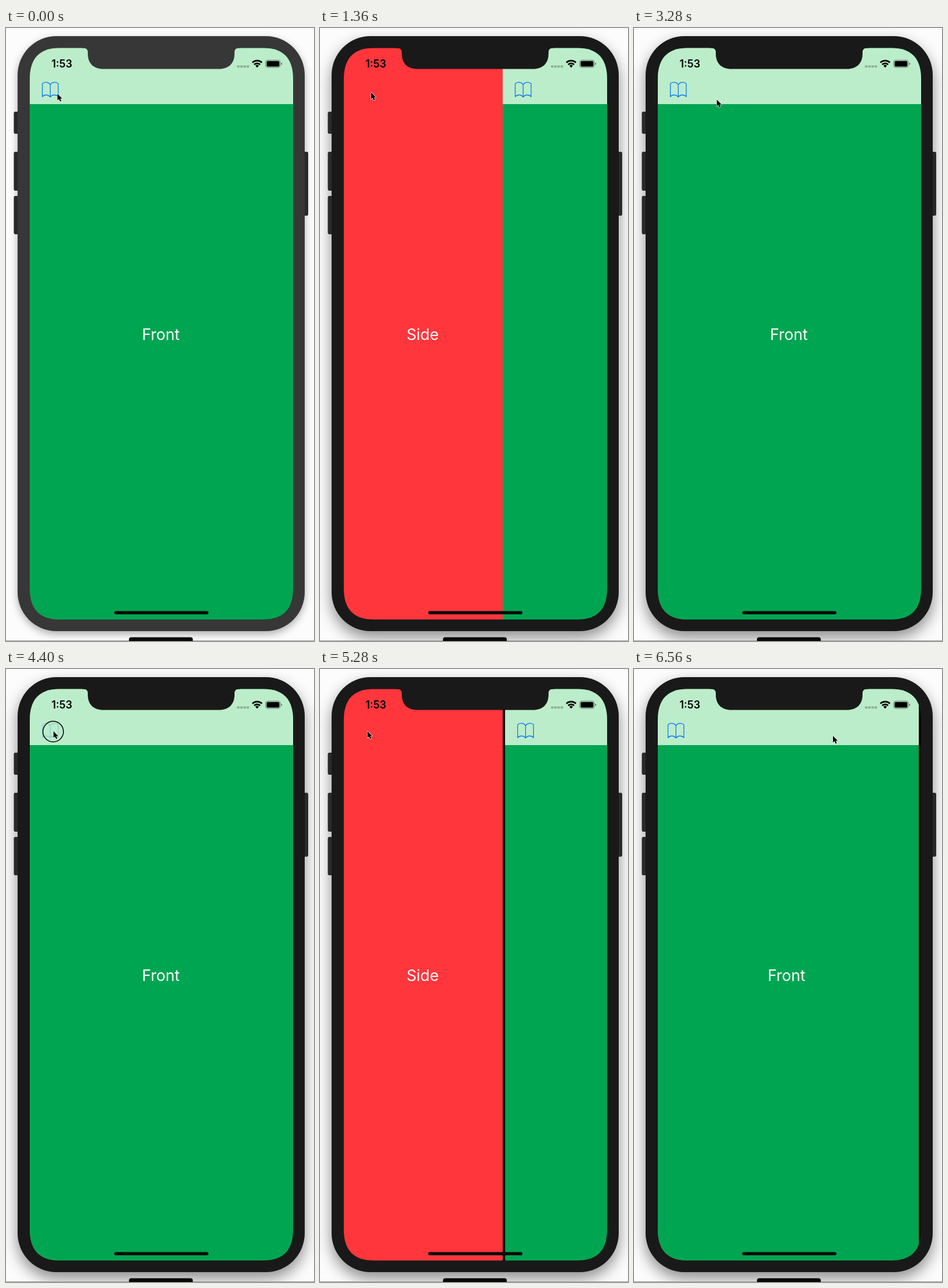
An HTML page for the animation above (6.64 s loop, 531x1055 px).

```html
<!DOCTYPE html>
<html lang="en">
<head>
<meta charset="utf-8">
<title>Side menu</title>
<style>
  html, body { margin: 0; width: 100%; height: 100%; overflow: hidden; background: #fcfcfc; }
  #stage { position: absolute; left: 0; top: 0; width: 531px; height: 1055px; overflow: hidden; }
  #body {
    position: absolute; left: 20px; top: 14px; width: 495px; height: 1024px;
    border-radius: 67px; background: #373737; box-shadow: 0 5px 14px rgba(0, 0, 0, .32);
  }
  .active #body { background: #191919; box-shadow: 0 11px 26px rgba(0, 0, 0, .45); }
  #notch { fill: #373737; }
  .active #notch { fill: #191919; }
  svg { position: absolute; left: 0; top: 0; }
  text { font-family: Inter, Roboto, sans-serif; }
  .label { font-size: 26.7px; fill: #fff; text-anchor: middle; }
</style>
</head>
<body>
<div id="stage">
  <div id="body"></div>
  <svg width="531" height="1055" viewBox="0 0 531 1055">
    <defs>
      <clipPath id="screen">
        <path d="M41 88 C41 52 58 34.5 92 34.5 H444 C478 34.5 495 52 495 88 V965 C495 1000 478 1018 444 1018 H92 C58 1018 41 1000 41 965 Z"/>
      </clipPath>
    </defs>

    <g fill="#292929">
      <path d="M20 144 H16 Q13.5 144 13.5 147 V179 Q13.5 182 16 182 H20 Z"/>
      <path d="M20 213 H16 Q13.5 213 13.5 216 V277 Q13.5 280 16 280 H20 Z"/>
      <path d="M20 289 H16 Q13.5 289 13.5 292 V352 Q13.5 355 16 355 H20 Z"/>
      <path d="M515 213 H518.5 Q521 213 521 216 V320 Q521 323 518.5 323 H515 Z"/>
    </g>
    <path d="M0 1054.5 H531" stroke="#999" stroke-width="1"/>
    <path d="M212 1055 V1052 Q212 1048.5 216 1048.5 H318 Q322 1048.5 322 1052 V1055 Z" fill="#0b0808"/>

    <g clip-path="url(#screen)">
      <rect x="40" y="34" width="456" height="985" fill="#000"/>
      <rect x="40" y="34" width="275" height="985" fill="#ff363c"/>
      <text class="label" x="177" y="537">Side</text>
      <g id="front">
        <rect x="41" y="34" width="454" height="985" fill="#00a551"/>
        <rect x="41" y="34" width="454" height="97" fill="#bcedca"/>
        <text class="label" x="267" y="537">Front</text>
        <path id="book" fill="none" stroke="#0d78f2" stroke-width="1.3" stroke-linejoin="round"
          d="M76.3 97.5 C73 92.5 66 92.3 62.6 96 V118.3 C66 114 73 114.2 76.3 119 C79.6 114.2 86.6 114 90 118.3 V96 C86.6 92.3 79.6 92.5 76.3 97.5 V119"/>
      </g>
    </g>
    <path id="notch" d="M131 33 V34.5 H134 Q141 34.5 141 42 V44 C141 61 151 70.5 168 70.5 H367 C384 70.5 394 61 394 44 V42 Q394 34.5 401 34.5 H404 V33 Z"/>

    <text x="78.5" y="68" font-size="18" font-weight="600">1:53</text>
    <g fill="#000" fill-opacity=".25">
      <rect x="398.3" y="64.2" width="4.3" height="4" rx="1"/>
      <rect x="403.8" y="64.2" width="4.3" height="4" rx="1"/>
      <rect x="409.3" y="64.2" width="4.3" height="4" rx="1"/>
      <rect x="414.8" y="64.2" width="4.3" height="4" rx="1"/>
    </g>
    <g fill="none" stroke="#000" stroke-width="2.7">
      <path d="M424.8 59.4 A12 12 0 0 1 441.2 59.4"/>
      <path d="M427.9 62.9 A7.4 7.4 0 0 1 438.1 62.9"/>
      <path d="M433 68.2 L430 65 A4.3 4.3 0 0 1 436 65 Z" fill="#000" stroke="none"/>
    </g>
    <rect x="447.5" y="55.2" width="25.5" height="12.8" rx="3.7" fill="none" stroke="#000" stroke-opacity=".45"/>
    <rect x="449.2" y="56.8" width="22.2" height="9.6" rx="2.2"/>
    <path d="M474.4 59.5 Q476.2 60 476.2 61.6 Q476.2 63.2 474.4 63.7 Z" fill-opacity=".5"/>
    <rect x="186.5" y="1003.4" width="162.5" height="5.5" rx="2.75" fill="#060a08"/>

    <g id="pointer">
      <circle id="ring" cx="-.5" cy=".8" r="17.7" fill="none" stroke="#000" stroke-width="1.5"/>
      <path d="M0 0 V11.6 L2.6 9.3 L4.5 13.6 L6.6 12.7 L4.8 8.5 H8.3 Z"
        fill="#000" stroke="#fff" stroke-width="1.2" stroke-linejoin="round" paint-order="stroke"/>
    </g>
  </svg>
</div>
<script>
  const LOOP = 6640, STEP = 80, MENU_WIDTH = 274;
  const FOCUS_TIME = 560;

  // Each tap: pressed, released, direction of the slide
  const taps = [[560, 693, 1], [2370, 2517, -1], [4160, 4925, 1], [6090, 6215, -1]];

  // Pointer stops: time, x, y
  const stops = [
    [0, 88.7, 113], [80, 88.7, 113], [320, 88.2, 111], [1540, 88.2, 111],
    [2180, 338, 109.8], [2960, 338, 109.8], [3280, 142.8, 123.2],
    [3680, 88, 110], [3840, 81.8, 107], [5540, 81.8, 107],
    [6060, 343, 115], [LOOP, 343, 115]
  ];

  const $ = id => document.getElementById(id);
  const clamp = v => Math.min(1, Math.max(0, v));
  const smooth = p => p * p * (3 - 2 * p);

  function spring(ms) {
    if (ms <= 0) return 0;
    const damping = 0.8, s = ms / 1000 * 14.5, root = Math.sqrt(1 - damping * damping);
    return 1 - Math.exp(-damping * s) * (Math.cos(root * s) + damping / root * Math.sin(root * s));
  }

  const slideAt = t => MENU_WIDTH * taps.reduce((sum, [, up, dir]) => sum + dir * spring(t - up), 0);

  function iconOpacity(t) {
    const tap = taps.filter(([down]) => down <= t).pop();
    if (!tap) return 1;
    const [down, up] = tap;
    const dimmed = 1 - 0.8 * clamp((Math.min(t, up) - down) / 260);
    return Math.min(1, dimmed + 0.8 * Math.max(0, t - up) / 350);
  }

  function pointerAt(t) {
    const i = stops.findIndex(([time]) => time > t);
    const [t0, x0, y0] = stops[i - 1], [t1, x1, y1] = stops[i];
    const p = smooth((t - t0) / (t1 - t0));
    return [x0 + (x1 - x0) * p, y0 + (y1 - y0) * p];
  }

  function render(now) {
    const t = Math.floor(now % LOOP / STEP) * STEP;
    $('stage').classList.toggle('active', t >= FOCUS_TIME);
    $('front').setAttribute('transform', `translate(${slideAt(t)} 0)`);
    $('book').setAttribute('opacity', iconOpacity(t));
    $('pointer').setAttribute('transform', `translate(${pointerAt(t)})`);
    const pressed = taps.some(([down, up]) => t >= down && t < up);
    $('ring').setAttribute('visibility', pressed ? 'visible' : 'hidden');
  }

  const start = performance.now();
  function tick() {
    render(performance.now() - start);
    requestAnimationFrame(tick);
  }
  tick();
</script>
</body>
</html>
```
